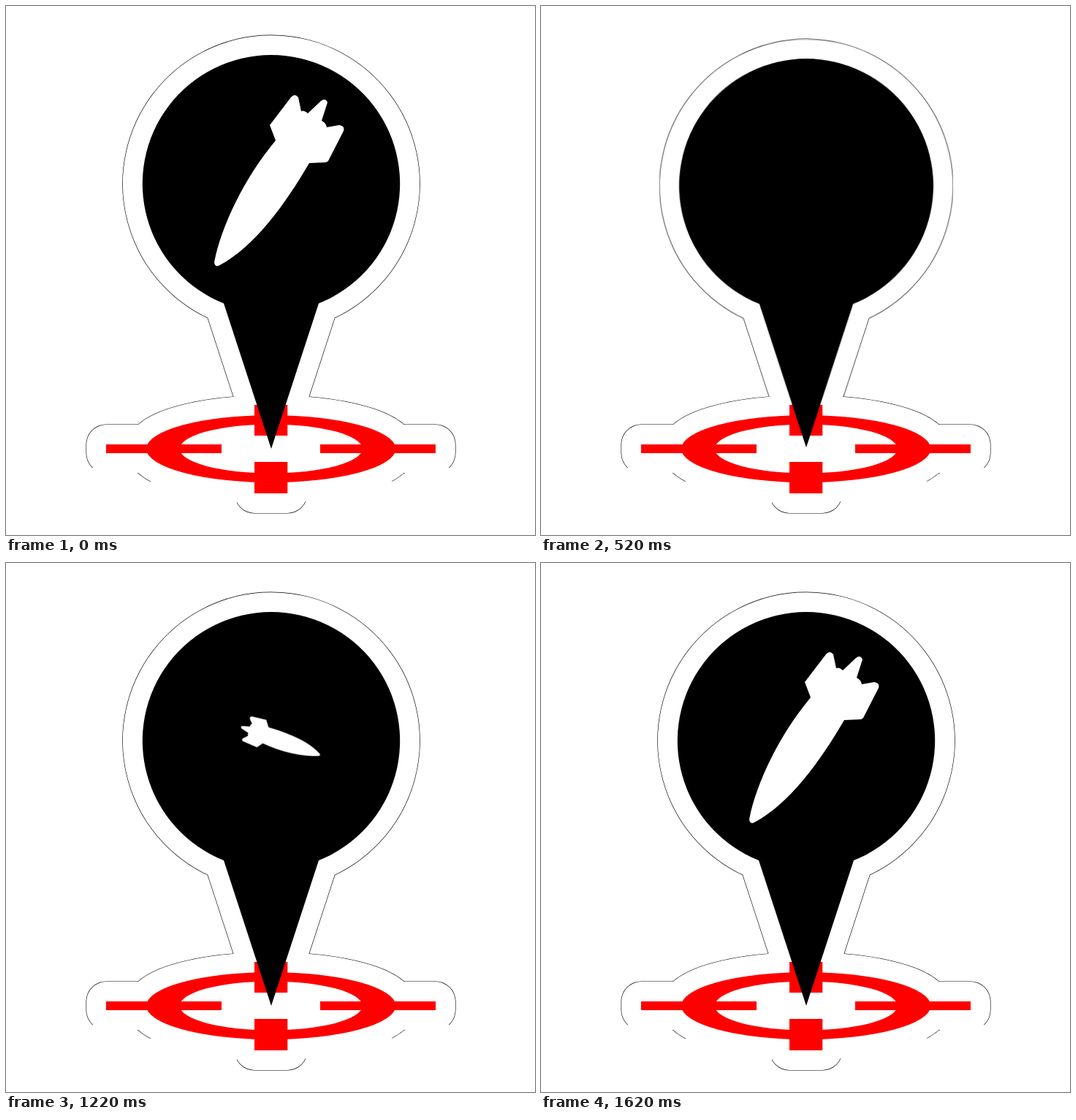
An HTML page for the animation above (1.74 s loop, 724 by 724 pixels).

```html
<!DOCTYPE html>
<html lang="en">
<head>
<meta charset="utf-8">
<title>Target pin</title>
<style>
  html, body { margin: 0; width: 100%; height: 100%; overflow: hidden; background: #fff; }
  svg { display: block; width: 100vw; height: 100vh; }

  .edge { fill: #000; stroke: #000; stroke-width: 55; stroke-linejoin: round; }
  .halo { fill: #fff; stroke: #fff; stroke-width: 53.8; stroke-linejoin: round; }

  .pin, .missile { animation: 1740ms cubic-bezier(.5, 0, .5, 1) infinite; }
  .pin { transform-origin: 363px 606px; animation-name: pop; }
  .missile { transform-origin: 373.5px 239.3px; animation-name: spin; fill: #fff; }

  /* Full at first, gone at 20 ms, grows 280-500 ms, rebounds until 620 ms */
  @keyframes pop {
    0% { transform: translateY(0) scale(1); animation-timing-function: step-end; }
    1.1494% { transform: translateY(0) scale(0); animation-timing-function: step-end; }
    16.092% { transform: translateY(0) scale(0); }
    28.736% { transform: translateY(0) scale(1); }
    32.184% { transform: translateY(-8px) scale(.944); }
    35.632%, 100% { transform: translateY(0) scale(1); }
  }

  /* Half a turn while growing, 880-1620 ms */
  @keyframes spin {
    0% { transform: rotate(0deg) scale(1); animation-timing-function: step-end; }
    1.1494% { transform: rotate(-180deg) scale(0); animation-timing-function: step-end; }
    50.575% { transform: rotate(-180deg) scale(0); }
    93.103%, 100% { transform: rotate(0deg) scale(1); }
  }
</style>
</head>
<body>
<svg viewBox="0 0 724 724">
  <defs>
    <path id="pin" d="M363 606 L298 407 A176.2 176.2 0 1 1 428 407 Z"/>
    <g id="target">
      <path fill-rule="evenodd" d="M192 606 a170.7 46 0 1 1 341.4 0 a170.7 46 0 1 1 -341.4 0 Z
        M237.7 606 a125 33.5 0 1 0 250 0 a125 33.5 0 1 0 -250 0 Z"/>
      <path d="M137 600 h158 v12 h-158 Z M430 600 h158 v12 h-158 Z
        M340 546 h45.3 v42 h-45.3 Z M340 624 h45.3 v43 h-45.3 Z"/>
    </g>
  </defs>

  <g class="edge">
    <use href="#target"/>
    <use href="#pin" class="pin"/>
  </g>
  <g class="halo">
    <use href="#target"/>
    <use href="#pin" class="pin"/>
  </g>
  <!-- Gaps in the lower contour -->
  <path fill="#fff" d="M100 632 h80 v10 h-80 Z M546 632 h80 v10 h-80 Z
    M198 645 h118 v35 h-118 Z M410 645 h118 v35 h-118 Z"/>

  <use href="#target" fill="#f00"/>
  <use href="#pin" class="pin"/>
  <path class="missile" d="M285 351 C295 300 326 236 369 184 L361 163 L390 125
    Q395 119 400 125 L404 144 Q408 142 413 147 L431 130 Q437 125 440 132 L432 157
    Q438 160 439 166 L456 163 Q464 164 462 171 L441 212 Q439 214 437 214 L415 215
    C383 270 340 330 292 355 Q286 358 285 351 Z"/>
</svg>
</body>
</html>
```
